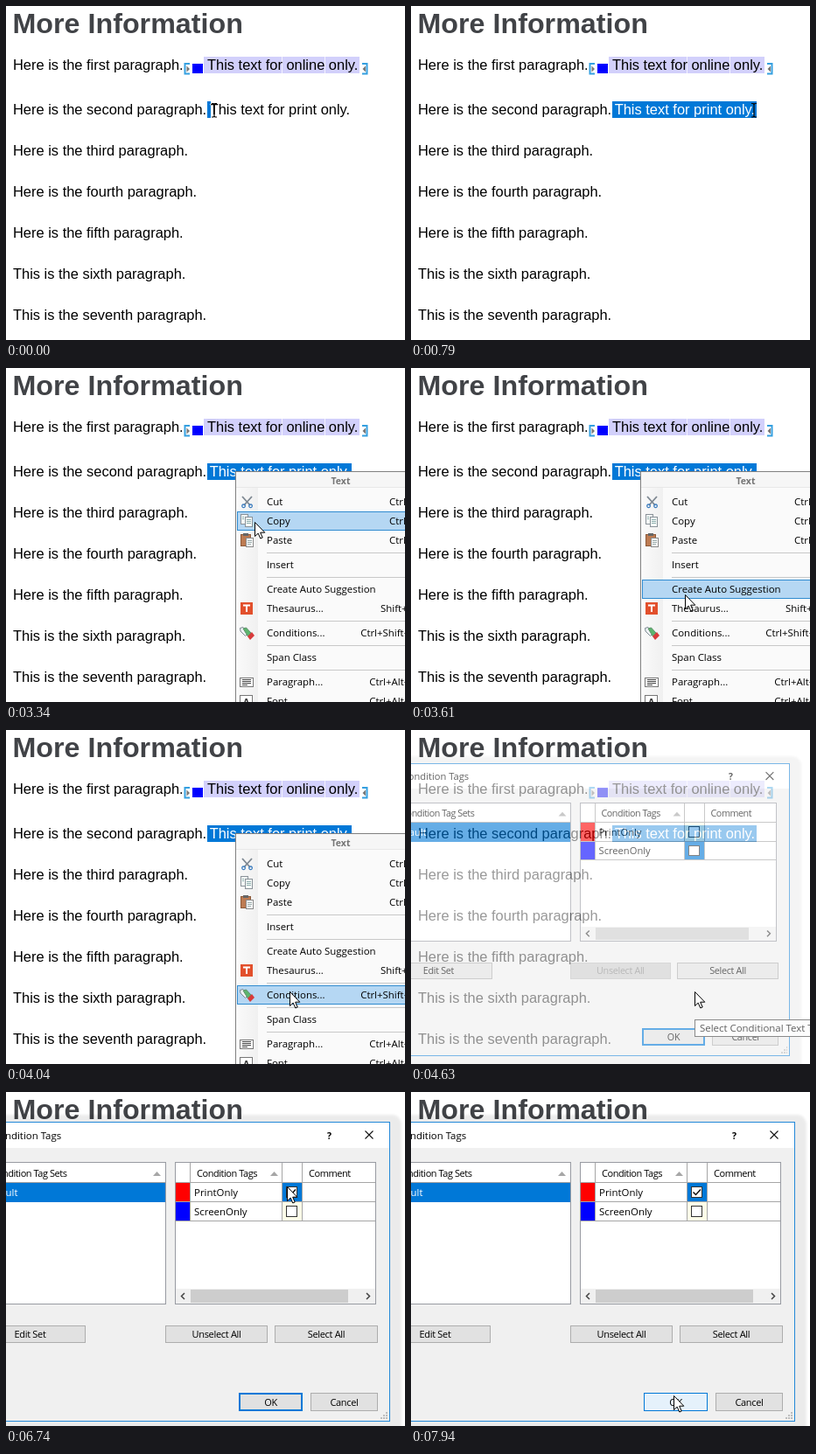
Recreate the animation shown at these times as an HTML page. Size 456 by 382 pixels, loop 8000 ms.

```html
<!DOCTYPE html>
<html lang="en">
<head>
<meta charset="utf-8">
<title>Condition tags</title>
<style>
html, body { margin: 0; width: 100%; height: 100%; overflow: hidden; background: #fff; }
svg { display: block; }
rect, line { shape-rendering: crispEdges; }
.doc { font: 16.45px "Liberation Sans", Arial, sans-serif; }
.head { font: bold 32.25px "Liberation Sans", Arial, sans-serif; }
.ui { font: 11.45px "Open Sans", "Noto Sans", sans-serif; }
.small { font: 11px "Open Sans", "Noto Sans", sans-serif; letter-spacing: -.3px; }
.th { font: 11px "Open Sans", "Noto Sans", sans-serif; letter-spacing: -.45px; }
.bold { font: bold 10.5px "Open Sans", "Noto Sans", sans-serif; }
</style>
</head>
<body>
<svg width="456" height="382" viewBox="0 0 456 382">
  <defs>
    <clipPath id="selClip"><rect id="selBox" x="230" y="109" height="19"/></clipPath>
    <filter id="soft" x="-10%" y="-10%" width="120%" height="120%"><feGaussianBlur stdDeviation="1.5"/></filter>
    <linearGradient id="margin"><stop offset="0" stop-color="#fafafa"/><stop offset="1" stop-color="#f0f0f0"/></linearGradient>
  </defs>
  <g id="page"></g>
  <g id="menu"></g>
  <g id="dialog"></g>
  <g id="tip"></g>
  <path id="beam" d="M-3 .5H-1L0 1.5L1 .5H3M0 1.5V15M-3 16H-1L0 15L1 16H3" fill="none" stroke="#000" stroke-width="1.2"/>
  <path id="arrow" d="M.5 .5V16.6L4.2 13.1L6.8 19L9.2 18L6.7 12.2H11.8Z" fill="#fff" stroke="#000"/>
</svg>
<script>
const $ = id => document.getElementById(id);
const BLUE = '#0078d7';

const rect = (x, y, w, h, fill) =>
  `<rect x="${x}" y="${y}" width="${w}" height="${h}" fill="${fill}"/>`;
const frame = (x, y, w, h, fill, edge, n = 1) =>
  rect(x, y, w, h, edge) + rect(x + n, y + n, w - 2 * n, h - 2 * n, fill);
const text = (x, y, cls, str, fill = '#000', anchor = 'start') =>
  `<text x="${x}" y="${y}" class="${cls}" fill="${fill}" text-anchor="${anchor}">${str}</text>`;
const path = (d, stroke, w = 1, fill = 'none') =>
  `<path d="${d}" stroke="${stroke}" stroke-width="${w}" fill="${fill}"/>`;
const solid = (d, fill) => path(d, 'none', 0, fill);

function buildPage() {
  const printText = fill => text(232.7, 124, 'doc', 'This text for print only.', fill);
  let s = text(7.5, 31, 'head', 'More Information', '#414347');
  s += text(8, 73, 'doc', 'Here is the first paragraph.');
  s += rect(226, 58, 178, 19, '#d2d0fb') + rect(315, 58, 1, 19, '#f3f2ff') + rect(364, 58, 1, 19, '#f3f2ff');
  s += text(230, 73, 'doc', 'This text for online only.') + rect(213, 66, 12, 11, '#00f');
  s += path('M210 66H204.5V77.5H210M407 66H412.5V77.5H407', '#35a0e0', 2);
  s += solid('M206.5 68.5V75.5L210 72ZM411 68.5V75.5L407.5 72Z', '#777');
  ['Here is the second', 'Here is the third', 'Here is the fourth', 'Here is the fifth',
    'This is the sixth', 'This is the seventh'].forEach((p, i) => {
    s += text(8, 124 + 47 * i, 'doc', p + ' paragraph.');
  });
  s += printText('#000');
  s += `<g clip-path="url(#selClip)">${rect(228, 109, 170, 19, BLUE)}${printText('#fff')}</g>`;
  return s;
}

const scissors = path('M270 147L279 157M281 147L272 157', '#7d8791', 1.8) +
  path('M271.5 156a1.8 1.8 0 1 0 .1 0M279.5 156a1.8 1.8 0 1 0 .1 0', '#3f7fc0', 1.3);
const pages = frame(268, 167, 9, 12, '#f4f8f6', '#8a9299') + frame(273, 170, 9, 12, '#f4f8f6', '#8a9299') +
  path('M275 173.5H280M275 175.5H280M275 177.5H280M270 170.5H272M270 172.5H272', '#8fb0b0');
const board = frame(268, 190, 12, 14, '#bd7b52', '#8c5a3a') + rect(271, 189, 6, 3, '#666') +
  frame(274, 194, 9, 11, '#fff', '#8a8a8a') + path('M276 197.5H281M276 199.5H281M276 201.5H280', '#9aa');
const book = rect(268, 268, 14, 14, '#e2502c') + path('M271 271.5H279M275 271.5V279', '#fff', 2);
const tags = path('M267.5 297.5L271 296.5L277 303L273.5 306.5L268 301Z', '#7b8790', 1, '#eef2f5') +
  path('M271 298L274.5 297L280 303L276.5 307Z', '#5f8f6a', 1, '#5cb56e') +
  solid('M276 307L281 302L284 306L279 311Z', '#d83b3b');
const para = frame(267, 354, 16, 11, '#fff', '#777') + path('M270 356.5H280M270 358.5H280M270 360.5H280M270 362.5H276', '#444');
const letter = frame(267, 374, 15, 14, '#fff', '#777') + text(274.5, 386, 'bold', 'A', '#333', 'middle');

function buildMenu() {
  let s = frame(262, 118, 220, 300, '#fafafa', '#808080');
  s += rect(263, 119, 200, 17, '#f6f6f6') + rect(263, 136, 200, 1, '#e8e8e8');
  s += text(382.5, 133, 'bold', 'Text', '#757575', 'middle');
  s += rect(263, 137, 25, 260, 'url(#margin)');
  for (const y of [211, 239, 289, 317, 345]) s += rect(298, y, 170, 1, '#c8c8c8');
  s += '<g id="hot">' + frame(264, 0, 220, 22, '#b5d7f3', '#2f8bd0') + '</g>';
  const items = [[153, 'Cut', 438, 'Ctrl+X'], [175, 'Copy', 438, 'Ctrl+C'], [197, 'Paste', 438, 'Ctrl+V'],
    [225, 'Insert'], [253, 'Create Auto Suggestion'], [275, 'Thesaurus...', 428, 'Shift+F7'],
    [303, 'Conditions...', 405.2, 'Ctrl+Shift+C'], [331, 'Span Class'],
    [359, 'Paragraph...', 415.2, 'Ctrl+Alt+P'], [381, 'Font...', 415.2, 'Ctrl+Alt+F']];
  for (const [y, name, x, key] of items) {
    s += text(298, y + 4, 'ui', name) + (key ? text(x, y + 4, 'ui', key) : '');
  }
  return s + scissors + pages + board + book + tags + para + letter;
}

const button = (x, y, w, h, label, fill = '#e1e1e1', edge = '#adadad', ink = '#000', n = 1) =>
  frame(x, y, w, h, fill, edge, n) + text(x + w / 2, y + h / 2 + 4, 'small', label, ink, 'middle');
const cell = (y, on) => rect(316, y, 22, 21, on ? BLUE : '#fdfde8') + frame(320, y + 4, 13, 13, '#fff', '#333');

function buildDialog() {
  let s = `<rect x="-60" y="26" width="512" height="374" rx="11" fill="#000" opacity=".075" filter="url(#soft)"/>`;
  s += frame(-60, 34, 499, 343, '#f0f0f0', '#2388d8') + rect(-59, 35, 497, 29, '#fff');
  s += text(-15.2, 54, 'ui', 'Condition Tags') + text(369.5, 53.5, 'bold', '?', '#000', 'middle');
  s += path('M410.5 44.5L419.5 53.5M419.5 44.5L410.5 53.5', '#111', 1.1);
  // tag sets
  s += frame(-50, 80, 233, 163, '#fff', '#989ba2') + rect(-50, 103, 232, 1, '#a0a0a0');
  s += text(69.5, 97, 'th', 'Condition Tag Sets', '#000', 'end') + solid('M168 96H177L172.5 91Z', '#a6a6a6');
  s += rect(-49, 104, 231, 22, BLUE) + text(13.5, 119, 'ui', 'Default', '#fff', 'end');
  // tags
  s += frame(193, 80, 230, 163, '#fff', '#989ba2');
  s += text(218, 97, 'th', 'Condition Tags') + text(346, 97, 'th', 'Comment') + solid('M302 96H311L306.5 91Z', '#a6a6a6');
  s += rect(194, 104, 16, 21, '#f00') + rect(194, 126, 16, 21, '#00f');
  s += text(215, 119, 'ui', 'PrintOnly') + text(215, 141, 'ui', 'ScreenOnly');
  s += '<g id="cells"></g>';
  for (const y of [103, 125, 147]) s += rect(194, y, 228, 1, '#a6a6a6');
  for (const x of [210, 315, 338]) s += rect(x, 81, 1, 67, '#a6a6a6');
  s += rect(194, 225, 228, 17, '#f0f0f0') + rect(211, 226, 180, 15, '#cdcdcd');
  s += path('M204 230L200.5 233.5L204 237M412 230L415.5 233.5L412 237', '#444', 1.5);
  s += button(-36, 267, 127, 20, 'Edit Set') + '<g id="unselect"></g>' + button(307, 267, 118, 20, 'Select All');
  s += '<g id="ok"></g>' + button(348, 344, 77, 21, 'Cancel');
  for (let i = 0; i < 3; i++) for (let j = 0; j <= i; j++) s += rect(434 - 3 * j, 366 + 3 * i, 2, 2, '#bdbdbd');
  return s;
}

$('page').innerHTML = buildPage();
$('menu').innerHTML = buildMenu();
$('dialog').innerHTML = buildDialog();
$('tip').innerHTML = frame(324, 331, 160, 20, '#fcfcfc', '#8a8a8a') + text(330, 345, 'ui', 'Select Conditional Text Tags', '#606060');

// Pointer and selection move in held steps: [time, ...values]
const drag = [[0, 234, 238], [140, 252, 256], [260, 282, 292], [380, 304, 324], [530, 350, 362],
  [650, 377.5, 382], [790, 395, 392]];
const pointer = [[920, 388, 116], [1350, 367, 117], [1490, 291, 117], [1640, 270, 117], [1760, 262, 117],
  [3340, 284, 176], [3470, 305, 224], [3610, 313, 259], [3760, 318, 278], [3890, 321, 292], [4040, 324, 299],
  [5460, 323, 289], [5610, 322, 214], [5760, 319, 179], [5920, 319, 154], [6060, 324, 130], [6210, 322, 117],
  [6340, 321, 108], [7270, 324, 130], [7400, 316, 198], [7530, 309, 248], [7680, 305, 300], [7800, 302, 333],
  [7940, 300, 347]];
const hotRow = [[0, 0], [3340, 164], [3470, 214], [3610, 242], [3760, 264], [3890, 0], [4040, 292]];
const opening = [[4500, .2, .955], [4630, .6, .977], [4770, .9, .993], [4900, 1, 1]];

const at = (steps, t) => steps.reduce((a, s) => s[0] <= t ? s : a, steps[0]);
const show = (id, on) => $(id).setAttribute('display', on ? 'inline' : 'none');
const move = (id, x, y) => $(id).setAttribute('transform', `translate(${x} ${y})`);
const cache = {};
const fill = (id, key, make) => {
  if (cache[id] !== key) { cache[id] = key; $(id).innerHTML = make(); }
};

function render(t) {
  const [, end, beamX] = at(drag, t);
  $('selBox').setAttribute('width', end - 230);
  show('beam', t < 920);
  move('beam', beamX, 111);
  show('arrow', t >= 920);
  const [, px, py] = at(pointer, t);
  move('arrow', px, py);

  show('menu', t >= 2350 && t < 4500);
  const row = at(hotRow, t)[1];
  show('hot', row > 0);
  move('hot', 0, row);
  show('tip', t >= 4350 && t < 4770);

  show('dialog', t >= 4500);
  const [, alpha, k] = at(opening, t);
  $('dialog').setAttribute('opacity', alpha);
  $('dialog').setAttribute('transform', `translate(195 205.5) scale(${k}) translate(-195 -205.5)`);

  const picked = t >= 6620, checked = t >= 6740, hover = t >= 7940;
  fill('cells', picked + '' + checked, () => cell(104, picked) + cell(126, !picked) +
    (checked ? path('M322.5 114.5L325.5 117.5L331 111.5', '#111', 1.5) : ''));
  fill('unselect', checked, () => checked ? button(182, 267, 117, 20, 'Unselect All')
    : button(182, 267, 117, 20, 'Unselect All', '#ccc', '#bfbfbf', '#8a8a8a'));
  fill('ok', hover, () => button(266, 344, 73, 21, 'OK', hover ? '#e5f1fb' : '#e1e1e1', BLUE, '#000', hover ? 1 : 2));
}

const start = performance.now();
function tick() {
  render((performance.now() - start) % 8000);
  requestAnimationFrame(tick);
}
render(0);
requestAnimationFrame(tick);
</script>
</body>
</html>
```
